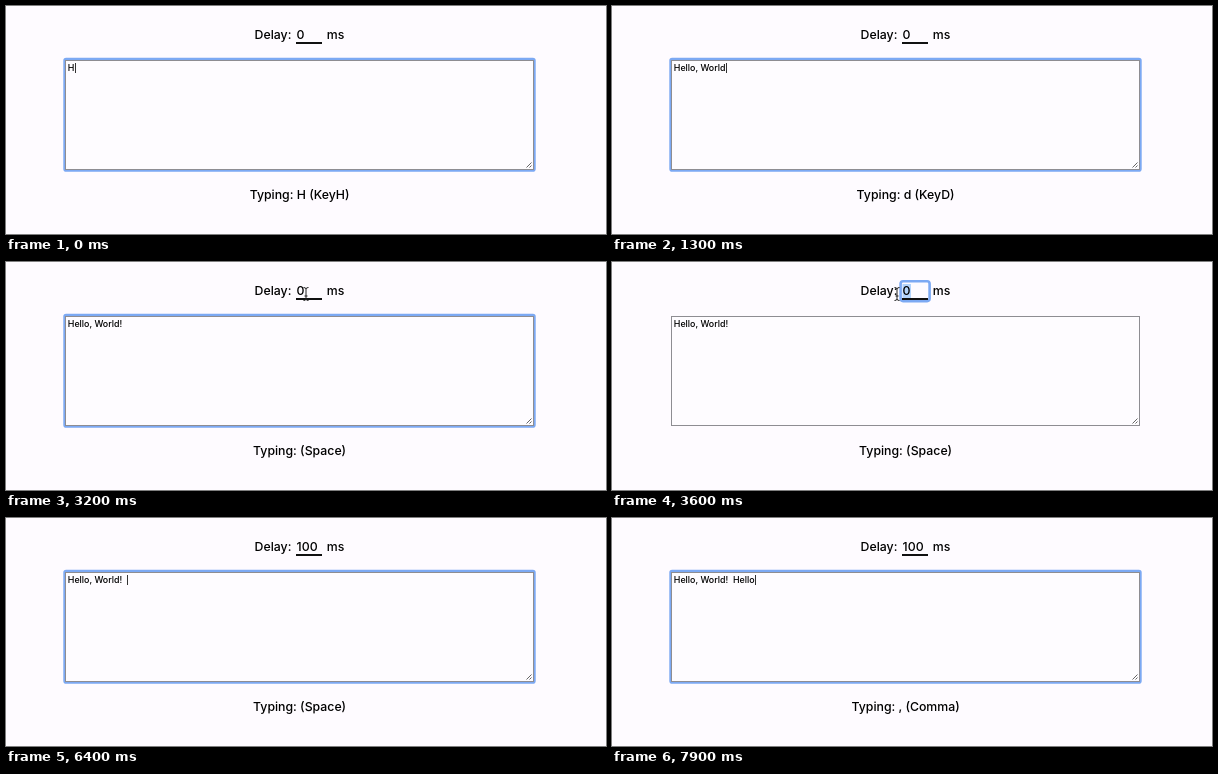
Recreate the animation shown at these times as an HTML page. Size 600x228 px, loop 8000 ms.

```html
<!DOCTYPE html>
<html lang="en">
<head>
<meta charset="utf-8">
<title>Typing delay</title>
<style>
  html, body { margin: 0; width: 100%; height: 100%; overflow: hidden; background: #fefbff; }
  svg { display: block; width: 600px; height: 228px; }
  text { font: 500 12.3px Inter, sans-serif; white-space: pre; fill: #000; }
  #content { font-size: 8.9px; }
  #status { text-anchor: middle; }
  .ring { fill: none; stroke: #7ca9f3; stroke-width: 2.6; }
  .caret { fill: #333; }
</style>
</head>
<body>
<svg viewBox="0 0 600 228">
  <text x="248.6" y="33">Delay:</text>
  <text x="320.8" y="33">ms</text>

  <rect id="inputRing" class="ring" x="288.6" y="19.3" width="29" height="19.8" rx="2.5"/>
  <rect id="selection" x="290.5" y="22" width="8.5" height="14" fill="#b3d4fc"/>
  <text id="delay" x="290.6" y="33"></text>
  <rect x="290" y="36" width="26" height="2" fill="#111"/>
  <rect id="inputCaret" class="caret" y="22" width="1" height="13"/>

  <rect id="areaRing" class="ring" x="58.6" y="53" width="469.8" height="111.4" rx="1.5"/>
  <rect x="59.5" y="54.5" width="468" height="109" fill="#fefcff" stroke="#8e8d92"/>
  <path d="M520.5 161.5l5-5M523.5 161.5l2-2" stroke="#555" stroke-width=".9"/>
  <text id="content" x="61.8" y="65.3"></text>
  <rect id="areaCaret" class="caret" y="57" width="1" height="10"/>

  <text id="status" x="293.6" y="192.5"></text>

  <path id="arrow" d="M0 0V13L3 10.2L5 14.8L7.2 13.8L5.2 9.4H9.2Z" stroke="#fff" stroke-width=".9"/>
  <path id="beam" d="M-2.5 -6.5Q0 -6.5 0 -5Q0 -6.5 2.5 -6.5M0 -5V5M-2.5 6.5Q0 6.5 0 5Q0 6.5 2.5 6.5M-1.5 2H1.5"
        fill="none" stroke="#222"/>
</svg>
<script>
const LOOP = 8000, STEP = 100, BLINK = 600;
const INPUT_FOCUS = 3300, SELECT = 3500, RETYPE = 5700, AREA_FOCUS = 6300;
const $ = id => document.getElementById(id);

// Bursts of typing, one key per step.
const bursts = { 0: 'Hel', 400: 'lo,', 800: ' World', 1600: '!', 2000: '  ', 7200: 'Hello', 7900: ',' };
const keys = Object.entries(bursts).flatMap(([start, chars]) =>
  [...chars].map((char, i) => {
    const pressed = +start + i * STEP;
    return { char, pressed, shown: pressed + (pressed > RETYPE ? 100 : 0) };
  }));
const codes = { ' ': 'Space', ',': 'Comma', '!': 'Digit1' };

const within = (t, from, to) => t >= from && t < to;
const progress = (t, from, to) => Math.min(1, Math.max(0, (t - from) / (to - from)));
const bezier = (a, b, c, k) => a * (1 - k) ** 2 + 2 * b * k * (1 - k) + c * k * k;
const show = (id, on) => $(id).setAttribute('visibility', on ? 'visible' : 'hidden');

function statusFor(char) {
  const code = codes[char] || 'Key' + char.toUpperCase();
  return `Typing: ${char.trim() && char + ' '}(${code})`;
}

function placeCaret(caretId, textId, on) {
  const text = $(textId);
  $(caretId).setAttribute('x', Math.ceil(+text.getAttribute('x') + text.getComputedTextLength()));
  show(caretId, on);
}

// A curved move up to the input, a drag to the left, then a rest inside the input.
function pointerAt(t) {
  const move = progress(t, 2400, 3200);
  const drag = t < 4000 ? progress(t, 3200, 3600) : 0;
  return [bezier(352, 431, 300, move) - 15 * drag, bezier(106, 25, 32, move)];
}

function render(t) {
  const inputFocused = within(t, INPUT_FOCUS, AREA_FOCUS);
  const selected = within(t, SELECT, RETYPE);
  const shown = keys.filter(key => key.shown <= t);
  const lastPressed = keys.filter(key => key.pressed <= t).pop();

  $('content').textContent = shown.map(key => key.char).join('');
  $('status').textContent = statusFor(lastPressed.char);
  $('delay').textContent = t < RETYPE ? '0' : '100'.slice(0, 1 + (t - RETYPE) / STEP);

  const lastActive = Math.max(shown[shown.length - 1].shown, t >= AREA_FOCUS ? AREA_FOCUS : 0);
  const blinkOn = Math.floor((t - lastActive) / BLINK) % 2 === 0;

  show('inputRing', inputFocused);
  show('areaRing', !inputFocused);
  show('selection', selected);
  placeCaret('inputCaret', 'delay', inputFocused && !selected);
  placeCaret('areaCaret', 'content', !inputFocused && blinkOn);

  const [x, y] = pointerAt(t);
  for (const id of ['arrow', 'beam']) $(id).setAttribute('transform', `translate(${x} ${y})`);
  show('arrow', within(t, 2400, 3100));
  show('beam', within(t, 3100, 5100));
}

const start = performance.now();
function tick(now) {
  const elapsed = Math.max(0, now - start) % LOOP;
  render(Math.floor(elapsed / STEP) * STEP);
  requestAnimationFrame(tick);
}
render(0);
requestAnimationFrame(tick);
</script>
</body>
</html>
```
